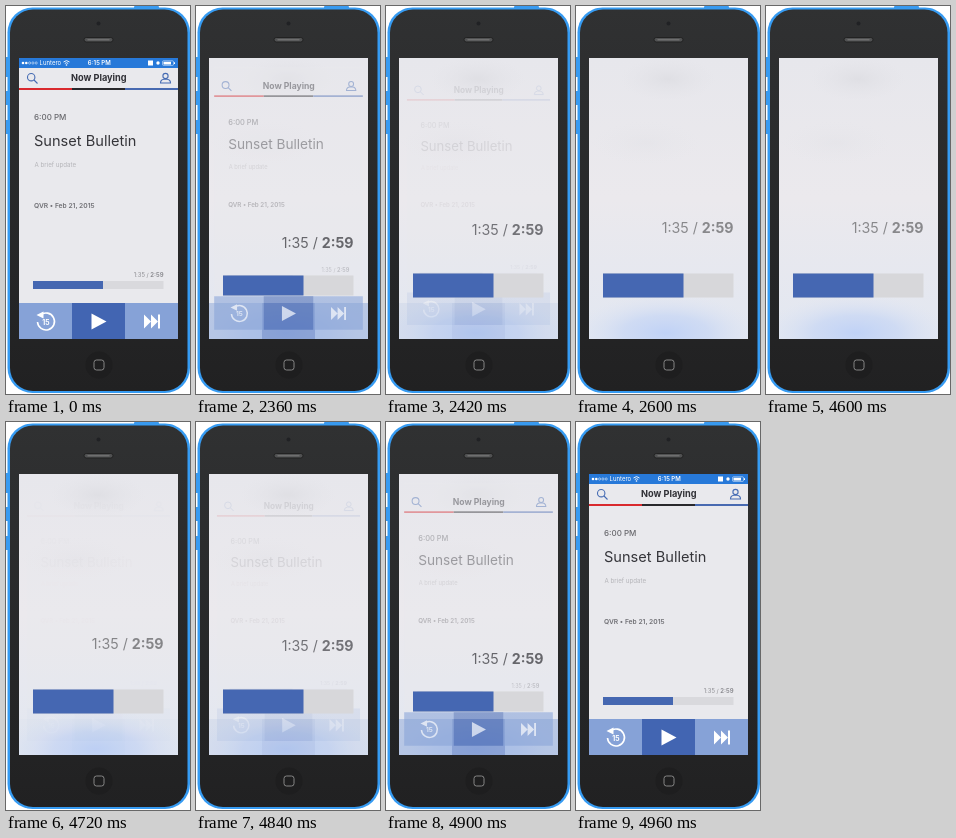
These frames come from a looping animation (184 by 388 pixels, 5380 ms). An HTML page:

```html
<!DOCTYPE html>
<html lang="en">
<head>
<meta charset="utf-8">
<title>Player pause screen</title>
<style>
  html, body { margin: 0; width: 100%; height: 100%; overflow: hidden; background: #fff; }
  svg { display: block; width: 184px; height: 388px; font-family: Inter, sans-serif; animation: pause 5380ms step-end infinite; }
  .bold { font-weight: 700; }
  .status { opacity: var(--status); }
  .player { transform: scale(var(--zoom)); transform-origin: 92.5px 192.5px; }
  .page { opacity: var(--page); }
  .keys { opacity: var(--keys); }
  .blur { opacity: var(--blur); }
  .big { opacity: var(--big); }
  .clock { transform: translateY(var(--drop)); fill: var(--ink); }
  .bar { transform: scaleY(var(--grow)); transform-origin: 0 279.5px; }
  .line { fill: none; stroke: #456bb3; }

  /* Opens over 240 ms and closes along the same path over 360 ms. */
  @keyframes pause {
    0%, 92.193%, 100% { --status: 1; --page: 1; --keys: 1; --blur: 0; --zoom: 1; --big: 0; --drop: 15px; --ink: #66666b; --grow: .83; }
    43.866%, 91.078% { --status: 0; --page: .42; --keys: .55; --blur: .45; --zoom: .935; --big: 1; --drop: 15px; --ink: #66666b; --grow: .83; }
    44.981%, 89.963% { --status: 0; --page: .1; --keys: .13; --blur: .12; --zoom: .9; --big: 1; --drop: 2px; --ink: #727277; --grow: 1; }
    46.097%, 88.848% { --status: 0; --page: .04; --keys: .05; --blur: .04; --zoom: .9; --big: 1; --drop: .8px; --ink: #7b7b7f; --grow: 1; }
    47.212%, 87.732% { --status: 0; --page: .01; --keys: .02; --blur: .02; --zoom: .9; --big: 1; --drop: .2px; --ink: #858588; --grow: 1; }
    48.327%, 85.502%, 86.617% { --status: 0; --page: 0; --keys: 0; --blur: 0; --zoom: .9; --big: 1; --drop: 0px; --ink: #88888b; --grow: 1; }
  }
</style>
</head>
<body>
<svg viewBox="0 0 184 388">
  <defs>
    <radialGradient id="glow">
      <stop offset="0" stop-color="#c0d2f6"/>
      <stop offset=".45" stop-color="#cad8f4" stop-opacity=".8"/>
      <stop offset="1" stop-color="#dfe5f3" stop-opacity="0"/>
    </radialGradient>
    <radialGradient id="shade">
      <stop offset="0" stop-color="#dfdfe4"/>
      <stop offset="1" stop-color="#e4e4e9" stop-opacity="0"/>
    </radialGradient>
    <linearGradient id="haze" x2="0" y2="1">
      <stop offset="0" stop-color="#e7e7ec"/>
      <stop offset=".5" stop-color="#ebe9ed"/>
      <stop offset="1" stop-color="#e2e7f1"/>
    </linearGradient>
    <linearGradient id="body" x2="0" y2="1">
      <stop offset="0" stop-color="#303132"/>
      <stop offset="1" stop-color="#212122"/>
    </linearGradient>
    <clipPath id="screen"><path d="M13 52h159v281H13z"/></clipPath>
    <g id="keybed">
      <path d="M13 297h159v36H13z" fill="#86a2d7"/>
      <path d="M66 297h53v36H66z" fill="#4265b2"/>
    </g>
  </defs>

  <!-- Phone -->
  <g fill="#3a9af0">
    <rect y="51" width="2" height="20"/>
    <rect y="85" width="2" height="14"/>
    <rect y="114" width="2" height="14"/>
    <rect x="128" width="25" height="3" rx="1"/>
  </g>
  <rect x="1.500" y="1.500" width="182.500" height="385.500" rx="25" fill="#369bf2"/>
  <rect x="4" y="3.500" width="177.500" height="381.500" rx="23" fill="url(#body)"/>
  <rect x="78" y="31.500" width="29" height="4.500" rx="2.200" fill="#505152" stroke="#222"/>
  <path d="M81.500 33.800h22" stroke="#7d7d7d"/>
  <circle cx="92.500" cy="17.500" r="2" fill="#202124"/>
  <circle cx="93" cy="359" r="13.500" fill="#1e1e1f"/>
  <rect x="88" y="354" width="10" height="10" rx="2.500" fill="none" stroke="#858585"/>

  <g clip-path="url(#screen)">
    <!-- Blurred backdrop -->
    <path d="M13 52h159v281H13z" fill="url(#haze)"/>
    <ellipse cx="92" cy="73" rx="48" ry="22" fill="url(#shade)"/>
    <ellipse cx="70" cy="137" rx="55" ry="22" fill="url(#shade)" opacity=".35"/>
    <ellipse cx="90" cy="327" rx="95" ry="39" fill="url(#glow)"/>
    <use href="#keybed" class="blur"/>

    <g class="player">
      <g class="page">
        <path d="M13 52h159v245H13z" fill="#e9e9ed"/>
        <g class="line" stroke-width="1.1">
          <circle cx="25.200" cy="71.200" r="3.700"/><path d="M28 74l3.500 3.500"/>
          <circle cx="159.500" cy="70" r="2.600"/><path d="M154.500 77q0-3.500 3.500-3.800h3q3.500 .3 3.500 3.800z"/>
        </g>
        <text x="92.800" y="75" font-size="9.200" text-anchor="middle" class="bold" fill="#303036">Now Playing</text>
        <path d="M13 82h53v2H13z" fill="#d9292e"/>
        <path d="M66 82h53v2H66z" fill="#28282c"/>
        <path d="M119 82h53v2h-53z" fill="#486ab1"/>
        <text x="28" y="114" font-size="8" font-weight="500" fill="#68686d">6:00 PM</text>
        <text x="28" y="140" font-size="14.600" fill="#35353a">Sunset Bulletin</text>
        <text x="28.500" y="161" font-size="6.200" fill="#b5b5b9">A brief update</text>
        <text x="28" y="202" font-size="6.700" font-weight="600" fill="#707075">QVR • Feb 21, 2015</text>
        <text x="157.500" y="271" font-size="5.900" text-anchor="end" fill="#8b8b90">1:35 / <tspan class="bold">2:59</tspan></text>
        <path d="M27 275h130.500v8H27z" fill="#d9d9dd"/>
        <path d="M27 275h70v8H27z" fill="#4567b1"/>
      </g>

      <!-- Playback keys -->
      <g class="keys">
        <use href="#keybed"/>
        <path d="M34.500 309A8.500 8.500 0 1 1 31.500 316" fill="none" stroke="#fff" stroke-width="1.600"/>
        <path d="M37.500 305.500v7l-7-3.500z" fill="#fff"/>
        <text x="40" y="318.500" font-size="7" text-anchor="middle" class="bold" fill="#fff">15</text>
        <path d="M85.500 307.500l15 8-15 8z" fill="#fff"/>
        <path d="M138 308.500l7 7-7 7zM145 308.500l7 7-7 7zM152 308.500h2v14h-2z" fill="#fff"/>
      </g>
    </g>

    <!-- Status bar -->
    <g class="status" fill="#fff" font-size="6">
      <path d="M13 52h159v10H13z" fill="#2779d9"/>
      <circle cx="17" cy="57" r="1.300"/><circle cx="20.300" cy="57" r="1.300"/>
      <g fill="none" stroke="#fff" stroke-width=".5">
        <circle cx="23.600" cy="57" r="1.100"/><circle cx="26.900" cy="57" r="1.100"/><circle cx="30.200" cy="57" r="1.100"/>
        <path d="M57.500 56q3-2.800 6 0M58.800 57.500q1.700-1.600 3.400 0" stroke-width=".9"/>
        <rect x="156.500" y="54.800" width="11" height="4.600" rx="1"/>
      </g>
      <circle cx="60.500" cy="59" r=".8"/>
      <text x="33.500" y="59.200">Luntero</text>
      <text x="93.300" y="59.200" text-anchor="middle" font-weight="600">6:15 PM</text>
      <rect x="142" y="54.500" width="5" height="5"/>
      <circle cx="152" cy="57" r="1.700"/>
      <path d="M157.500 55.800h7.500v2.600h-7.500zM168 56.200h1v1.800h-1z"/>
    </g>

    <!-- Enlarged progress -->
    <g class="big">
      <text class="clock" x="157.500" y="227" font-size="14.200" text-anchor="end">1:35 / <tspan class="bold">2:59</tspan></text>
      <g class="bar">
        <path d="M27 267.500h130.500v24H27z" fill="#d7d7da"/>
        <path d="M27 267.500h80.500v24H27z" fill="#4567b2"/>
      </g>
    </g>
  </g>
</svg>
</body>
</html>
```
